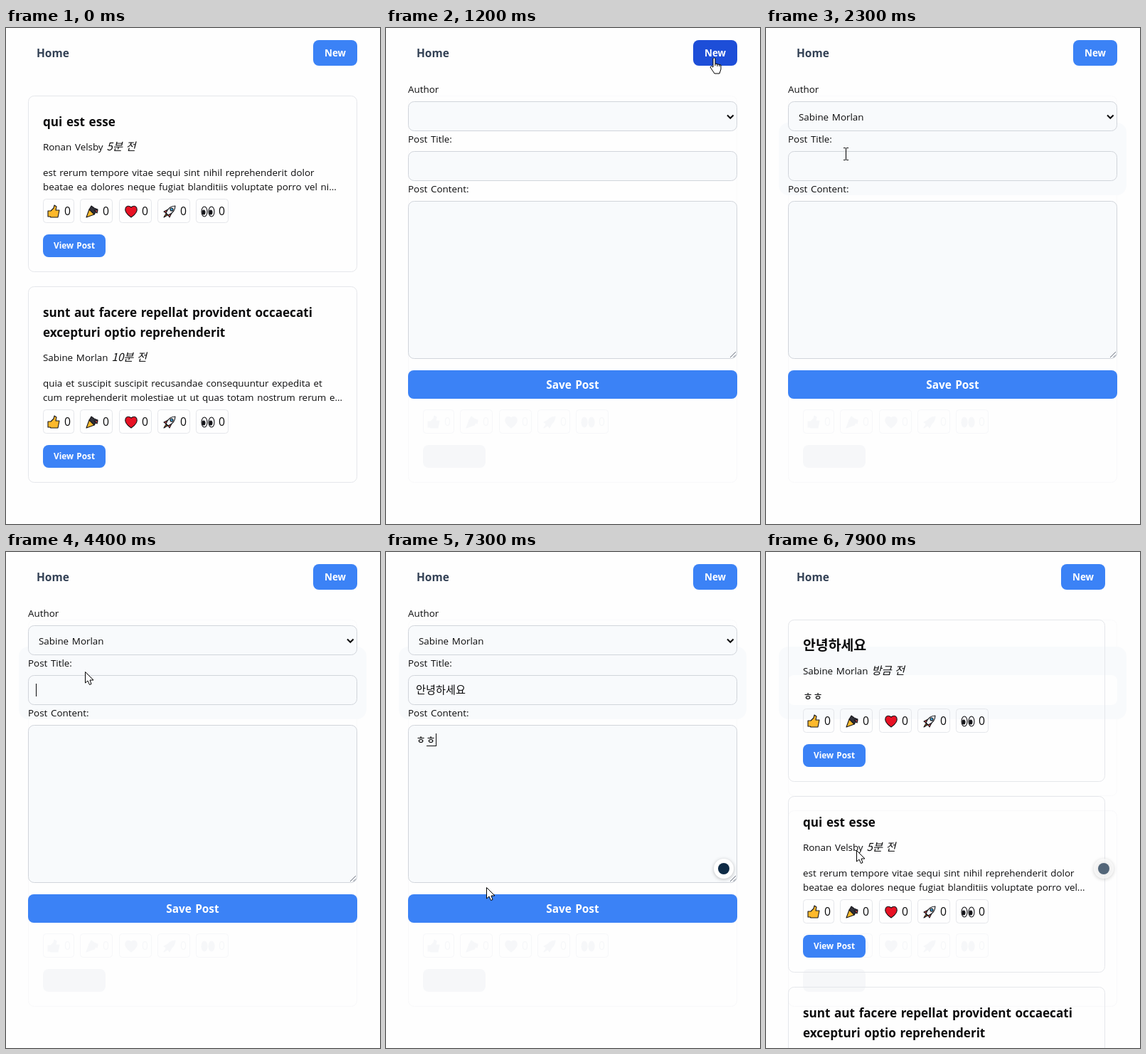
Recreate the animation shown at these times as an HTML page with a canvas. Size 526 px wide and 697 px high, loop 8 s.

```html
<!DOCTYPE html>
<html lang="ko">
<head>
<meta charset="utf-8">
<title>Posts</title>
<style>
html, body { margin: 0; width: 100%; height: 100%; overflow: hidden; background: #fefefe; }
canvas { display: block; }
</style>
</head>
<body>
<canvas id="stage" width="526" height="697"></canvas>
<script>
const ctx = document.getElementById('stage').getContext('2d');
const LOOP = 8000, STEP = 100;
const LATIN = '"Open Sans", "Noto Sans", sans-serif';
const HANGUL = '"Noto Sans CJK KR", "Noto Sans CJK JP", sans-serif';
const BLUE = '#3b82f6', DARK_BLUE = '#1d4ed8', INK = '#0b0b0c';
const PAGE = '#fefefe', LINE = '#e5e7eb', FIELD = '#f8fafc', FAINT = '#f6f7f9';
const LEFT = 31, RIGHT = 494, NARROW = 477, CHAR = 14;
const USERS = ['', 'Sabine Morlan', 'Ronan Velsby'];

// Moments of the story, in ms
const ENTER = 300, FORM = 1200, OPEN = 1700, CHOSEN = 2300, TITLE = 2600,
      CONTENT = 5600, BADGE = 5800, SAVE = 7400, SAVED = 7700;
const EDITS = [TITLE, 3000, 3400, 4500, 4900, 5300, CONTENT, 7100];

// Pointer legs: start, end, destination
const LEGS = [
  [ENTER, 500, 461, 41], [FORM, 1500, 113, 128], [1800, 2000, 112, 177],
  [TITLE, 2800, 111, 168], [6200, 6400, 116, 313], [7100, SAVE, 144, 491],
  [7600, 7900, 127, 419]
];

const POSTS = [
  { title: ['안녕하세요'], author: USERS[1], ago: '방금 전', body: ['ㅎㅎ'] },
  { title: ['qui est esse'], author: USERS[2], ago: '5분 전',
    body: ['est rerum tempore vitae sequi sint nihil reprehenderit dolor',
           'beatae ea dolores neque fugiat blanditiis voluptate porro vel ni...'] },
  { title: ['sunt aut facere repellat provident occaecati', 'excepturi optio reprehenderit'],
    author: USERS[1], ago: '10분 전',
    body: ['quia et suscipit suscipit recusandae consequuntur expedita et',
           'cum reprehenderit molestiae ut ut quas totam nostrum rerum e...'] }
];

const oval = (x, y, rx, ry) => `M${x - rx} ${y}a${rx} ${ry} 0 1 1 ${2 * rx} 0a${rx} ${ry} 0 1 1 ${-2 * rx} 0Z`;
const EMOJI = [
  { '#fdb92c': 'M2 9H6L10 5 11 1 14 3 13 8H18L16 18H6L5 17H2Z' },
  { '#33333b': 'M6 7 9 2 13 5 18 7 13 14Z', '#fdb92c': 'M2 18 6 7 13 14Z', '#e5484d': 'M13 8 18 8 17 12Z' },
  { '#e81224': 'M10 18C-5 8 4-2 10 4 16-2 25 8 10 18Z' },
  { '#e5484d': 'M2 10 8 7 5 12ZM10 18 13 12 8 15Z', '#f28a24': 'M2 18 5 13 7 15Z',
    '#f1f3f5': 'M5 12Q9 2 18 2 18 11 8 15Z', '#3fa7dc': oval(13, 7, 2, 2) },
  { '#ffffff': oval(5, 10, 4, 7) + oval(15, 10, 4, 7), '#16161a': oval(4, 11, 2, 3) + oval(14, 11, 2, 3) }
].map(parts => Object.entries(parts).map(([color, d]) => [color, new Path2D(d)]));

const ARROW = new Path2D('M.5.5V16L4 13 6.5 18.5 9 17.5 7 12H12Z');
const HAND = new Path2D('M-1 2Q.5-.5 2 2V9L10 11V17L8 23H1L-5 14Q-4 11-1 14Z');

const isKorean = s => /[ᄀ-ᇿㄱ-힣]/.test(s);
const inside = (p, x, y, w, h) => p.x >= x && p.x < x + w && p.y >= y && p.y < y + h;

function text(s, x, y, { size, bold, italic, color = INK, align = 'left' } = {}) {
  const korean = isKorean(s);
  const weight = bold ? 700 : korean ? 300 : 400;
  ctx.font = `${italic ? 'italic' : ''} ${weight} ${size || (korean ? 15.2 : 13.4)}px ${korean ? HANGUL : LATIN}`;
  ctx.wordSpacing = '1.2px';
  ctx.textAlign = align;
  ctx.fillStyle = color;
  ctx.fillText(s, x, y);
  return ctx.measureText(s).width;
}

function box(x, y, w, h, r, fill, stroke) {
  const inset = stroke ? 0.5 : 0;
  ctx.beginPath();
  ctx.roundRect(x + inset, y + inset, w - 2 * inset, h - 2 * inset, r);
  if (fill) { ctx.fillStyle = fill; ctx.fill(); }
  if (stroke) { ctx.strokeStyle = stroke; ctx.lineWidth = 1; ctx.stroke(); }
}

function trace(d, color, width) {
  ctx.strokeStyle = color;
  ctx.lineWidth = width;
  ctx.stroke(new Path2D(d));
}

// Draws a button and reports whether the pointer is over it
function button(label, x, y, w, h, size, p) {
  const hover = inside(p, x, y, w, h);
  box(x, y, w, h, 8, hover ? DARK_BLUE : BLUE);
  text(label, x + w / 2, y + h / 2 + size * 0.37, { size, bold: true, color: '#fff', align: 'center' });
  return hover;
}

function emoji(parts, x, y, tone) {
  ctx.save();
  ctx.translate(x, y);
  ctx.lineWidth = 1.1;
  ctx.lineJoin = 'round';
  for (const [color, path] of parts) {
    ctx.fillStyle = tone || color;
    ctx.strokeStyle = tone || '#16161a';
    ctx.fill(path);
    ctx.stroke(path);
  }
  ctx.restore();
}

function reactions(y, tone) {
  EMOJI.forEach((parts, i) => {
    const slot = Math.round(50 + 54.3 * i), x = Math.max(52, slot), right = slot + 46;
    box(x, y, right - x, 34, 4, null, tone || LINE);
    emoji(parts, right - 39, y + 8, tone);
    text('0', right - 14, y + 23, { size: 15.7, color: tone || INK });
  });
}

// Pale traces left behind by earlier views
function traces(t) {
  box(LEFT, 95, RIGHT - LEFT, 248, 8, null, '#fafafb');
  box(LEFT, 363, RIGHT - LEFT, 276, 8, null, '#f8f8fa');
  reactions(536, FAINT);
  box(52, 586, 88, 32, 8, FAINT);
  if (t >= OPEN) box(18, 133, 489, 102, 14, FIELD);
  if (t >= SAVED) box(LEFT, 173, RIGHT - LEFT, 42, 8, PAGE);
}

function header(right, p) {
  text('Home', 43, 41, { size: 15.5, bold: true, color: '#334155' });
  return button('New', right - 62, 17, 62, 36, 13.4, p);
}

function card(top, right, post, p) {
  const wrapped = (post.title.length - 1) * 28, short = (post.body.length - 2) * 20;
  const height = 248 + wrapped + short;
  box(LEFT, top, right - LEFT, height, 8, null, LINE);
  post.title.forEach((line, i) => {
    text(line, 52, top + 43 + i * 28, { size: isKorean(line) ? 19.4 : 17.1, bold: true });
  });
  const y = top + wrapped;
  const w = text(post.author, 52, y + 77);
  text(post.ago, 52 + w + 5, y + 77, { italic: true });
  post.body.forEach((line, i) => {
    const fitted = right < RIGHT ? line.replace(' ni...', '...') : line;
    text(fitted, 52, y + 113 + i * 20);
  });
  reactions(y + short + 145);
  button('View Post', 52, y + short + 195, 88, 32, 11.8, p);
  return top + height + 20;
}

function home(right, posts, p) {
  posts.reduce((top, post) => card(top, right, post, p), 95);
  return header(right, p) ? 'hand' : 'arrow';
}

// One keystroke per gap; Hangul builds up letter by letter
function type(s, t, start, gap) {
  const keys = Math.max(0, Math.floor((t - start) / gap) + 1);
  return s.normalize('NFD').slice(0, keys).normalize('NFC');
}

function typed(s, base, focused, t) {
  text(s, 42, base);
  if (!focused) return;
  const end = 42 + s.length * CHAR;
  const idle = t - EDITS.filter(e => e <= t).pop();
  ctx.fillStyle = INK;
  if (s) ctx.fillRect(end - CHAR + 1, base + 3, CHAR - 1, 1);
  if (Math.floor(idle / 500) % 2 === 0) ctx.fillRect(end, base - 14, 1, 18);
}

function shadowed(blur, paint) {
  ctx.save();
  ctx.shadowColor = 'rgba(0,0,0,.25)';
  ctx.shadowBlur = blur;
  ctx.shadowOffsetY = 1;
  paint();
  ctx.restore();
}

function dropdown(p) {
  const row = 25, top = 146, width = RIGHT - LEFT;
  shadowed(9, () => box(LEFT, top - 1, width, 76, 0, '#fff'));
  box(LEFT, top - 1, width, 76, 0, null, '#9ca3af');
  const active = Math.max(0, Math.floor((p.y - top) / row));
  USERS.forEach((name, i) => {
    const on = i === active, y = top + i * row;
    if (on) box(LEFT + 1, y, width - 2, row - 1, 0, '#1967d2');
    text(name, 46, y + 17, { color: on ? '#fff' : INK });
  });
}

function badge(alpha) {
  ctx.save();
  ctx.globalAlpha = alpha;
  shadowed(5, () => box(461, 431, 28, 28, 14, '#fff'));
  box(467, 437, 16, 16, 8, '#0f2b46');
  ctx.restore();
}

function form(t, p) {
  const width = RIGHT - LEFT, open = t >= OPEN && t < CHOSEN;
  let kind = header(RIGHT, p) ? 'hand' : 'arrow';
  ['Author', 'Post Title:', 'Post Content:'].forEach((label, i) => {
    const y = 103 + 70 * i, h = i === 2 ? 222 : 42;
    text(label, LEFT, y - 12);
    box(LEFT, y, width, h, 8, FIELD, '#d1d5db');
    if (i > 0 && !open && inside(p, LEFT, y, width, h)) kind = 'beam';
  });
  trace('M480 122.5 484.3 126.8 488.6 122.5', INK, 2);
  trace('M484 463 492 455M488.5 463 492 459.5', '#6b7280', 1);

  if (t >= CHOSEN) text(USERS[1], 46, 130);
  const title = t < 3400 ? type('아', t, 3000, STEP) : type('안녕하세요', t, 4500, 80);
  typed(title, 199, t >= TITLE && t < CONTENT, t);
  typed(type('ㅎㅎ', t, 7100, STEP), 269, t >= CONTENT && t < SAVE, t);
  if (button('Save Post', LEFT, 481, width, 40, 15.4, p)) kind = 'hand';
  if (open) dropdown(p);
  if (t >= BADGE) badge(1);
  return kind;
}

function pointer(t) {
  const p = { x: 500, y: 52 };
  for (const [start, end, x, y] of LEGS) {
    const k = Math.min(1, Math.max(0, (t - start) / (end - start)));
    const eased = 1 - (1 - k) ** 2;
    p.x += (x - p.x) * eased;
    p.y += (y - p.y) * eased;
  }
  return p;
}

function cursor(kind, p) {
  ctx.save();
  ctx.translate(Math.round(p.x), Math.round(p.y));
  if (kind === 'beam') {
    trace('M.5-8V8M-3-8.5H0M1-8.5H4M-3 8.5H0M1 8.5H4', '#000', 1);
  } else {
    const shape = kind === 'hand' ? HAND : ARROW;
    ctx.fillStyle = '#fff';
    ctx.fill(shape);
    ctx.strokeStyle = '#000';
    ctx.lineWidth = 1;
    ctx.stroke(shape);
    if (kind === 'hand') trace('M2 9V12M5 10V13M8 11V13', '#000', 1);
  }
  ctx.restore();
}

function draw(t) {
  const p = pointer(t);
  let kind;
  ctx.fillStyle = PAGE;
  ctx.fillRect(0, 0, 526, 697);
  if (t >= FORM) traces(t);
  if (t < FORM) kind = home(RIGHT, POSTS.slice(1), p);
  else if (t < SAVED) kind = form(t, p);
  else {
    kind = home(NARROW, POSTS, p);
    badge(1 - (t - SAVED + STEP) / 1000);
  }
  if (t >= ENTER) cursor(kind, p);
}

function tick() {
  draw(Math.floor((performance.now() % LOOP) / STEP) * STEP);
  requestAnimationFrame(tick);
}
tick();
</script>
</body>
</html>
```
